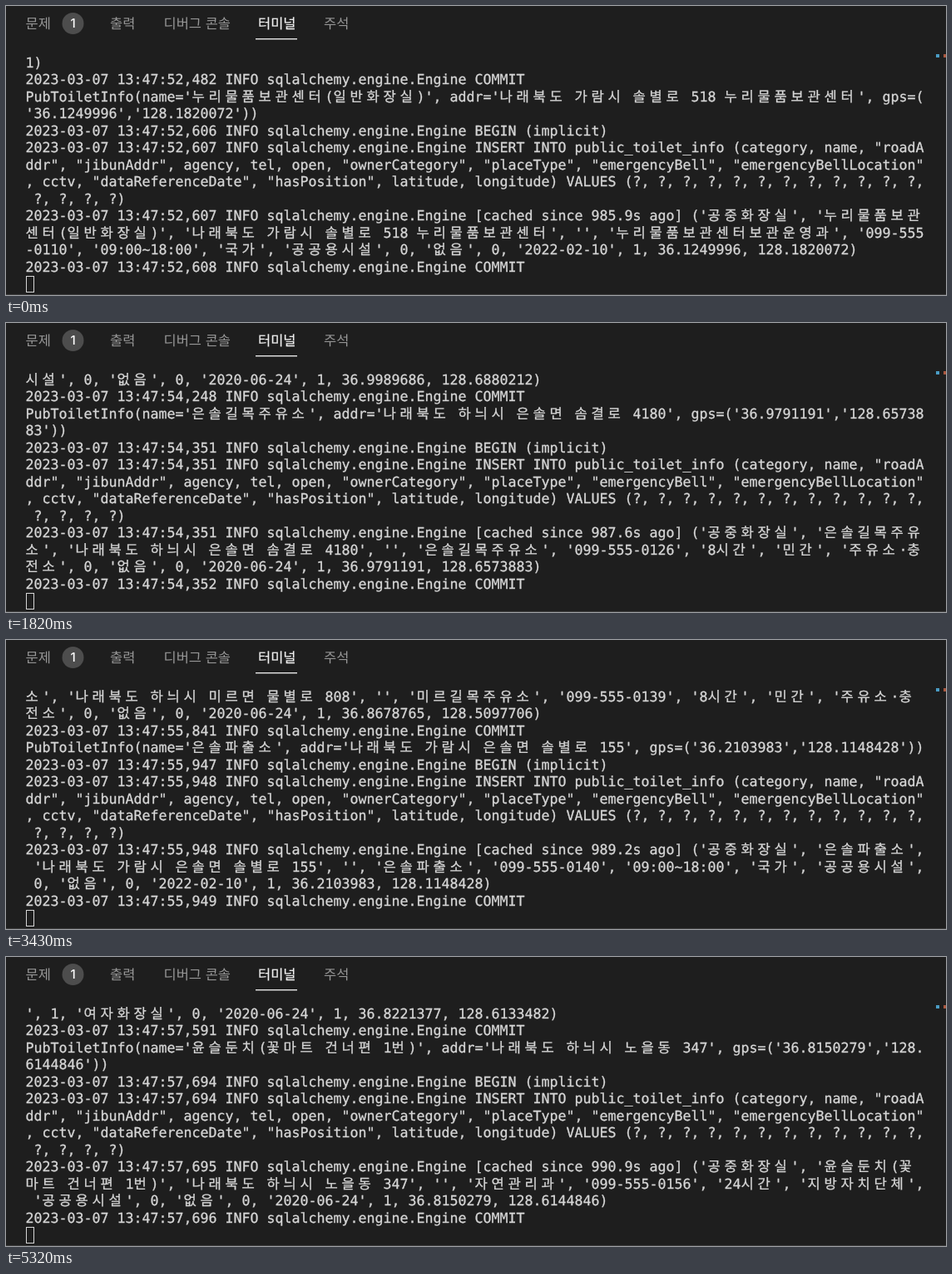
Animation of 1130 by 348 pixels, one loop 5390 ms. Source, as an HTML page:

```html
<!DOCTYPE html>
<html lang="ko">
<head>
<meta charset="utf-8">
<title>터미널</title>
<style>
  html, body { margin: 0; width: 100%; height: 100%; overflow: hidden; background: #1e1e1e; }
  svg { display: block; width: 1130px; height: 348px; text-rendering: geometricPrecision; }
  .tabs { font: 16.5px "Noto Sans CJK KR", sans-serif; fill: #979797; }
  .tabs .on { fill: #f0f0f0; stroke: #f0f0f0; stroke-width: 0.2; }
  .badge { font: 500 15px Inter, sans-serif; fill: #fff; text-anchor: middle; }
  .term { font: 16.61px "DejaVu Sans Mono", "Noto Sans CJK KR", monospace; fill: #d6d6d6; stroke: #d6d6d6; stroke-width: 0.3; }
</style>
</head>
<body>
<svg viewBox="0 0 1130 348">
  <rect width="1130" height="348" fill="#1e1e1e"/>
  <g class="tabs">
    <text x="23.5" y="27">문제</text>
    <text x="125" y="27">출력</text>
    <text x="189.5" y="27">디버그 콘솔</text>
    <text x="303" y="27" class="on">터미널</text>
    <text x="382" y="27">주석</text>
  </g>
  <circle cx="80.5" cy="21" r="13" fill="#4d4d4d"/>
  <text class="badge" x="80.5" y="26.4">1</text>
  <rect x="300" y="39" width="50" height="1.4" fill="#e7e7e7"/>
  <rect x="1118" y="58" width="4" height="4" fill="#4a9cc4"/>
  <rect x="1127" y="58" width="3" height="4" fill="#a9573f"/>
  <rect y="347" width="1130" height="1" fill="#3a3a3a"/>
  <g class="term" id="term"></g>
  <rect x="24.5" y="325.5" width="9" height="19" fill="none" stroke="#d6d6d6"/>
</svg>
<script>
const COLS = 108, CELL = 10, LEFT = 23.5, TOP = 74, PITCH = 20.5, VIEW = 13;
const TICK = 70;

// One mark per tick: r = whole record, h = record still uncommitted, c = its commit
const FEED = '--r-rrr-r-rr-r-rr-r-rrr-rhcrr-r-rr-r-r-r' +
  '-r-rhcrhcr-rhcr-r-rr-r-rhcr-rr-rr-rhc';

// Commit times of some records, in ms after 13:47:52
const COMMITS = [[0, 608], [5, 1195], [6, 1313], [15, 2248], [16, 2352], [26, 3514], [27, 3626],
  [33, 4272], [34, 4379], [38, 4851], [39, 4969], [45, 5591], [46, 5696]];

// name | address | agency | hours | owner | latitude | longitude | place | bell | bell location
const LOCAL = '지방자치단체', PUBLIC = '공공용시설', DAY = '09:00~18:00';
const PLACES = {
  0: `누리물품보관센터(일반화장실)|가람시 솔별로 518 누리물품보관센터|누리물품보관센터보관운영과|${DAY}|국가|36.1249996|128.1820072`,
  5: `새터면사무소|가람시 솔별로 71||${DAY}|${LOCAL}||`,
  6: `달솔면 보건지소|하늬시 달솔면 은결로 63||8시간|${LOCAL}|36.8614240|128.5250130`,
  15: `은솔면보건소|하늬시 은솔면 솜결로 964||8시간|${LOCAL}|36.9989686|128.6880212`,
  16: '은솔길목주유소|하늬시 은솔면 솜결로 4180||8시간|민간|36.9791191|128.6573883|주유소·충전소',
  26: '여울우체국|하늬시 미르면 미르로 82||8시간|국가|36.7748667|128.5782125',
  27: `미르면사무소(본관)|하늬시 미르면 미르로 85|미르면사무소|8시간|${LOCAL}|36.7747080|128.5786880`,
  33: `초롱동주민센터2층 화장실|가람시 물별로 236|초롱동주민센터|${DAY}|${LOCAL}|36.1104660|128.1233942`,
  34: `초롱동주민센터3층 화장실|가람시 물별로 236|초롱동주민센터|${DAY}|${LOCAL}|36.1104660|128.1233942`,
  38: '하늬도로관리사무소|하늬시 미르로 519번길 38|하늬시도로관리사무소|8시간|국가|36.8007690|128.5887630',
  39: '미르파출소|하늬시 미르면 구슬로 8||8시간|국가|36.7766524|128.5790140',
  45: `윤슬둔치공원입구|하늬시 노을동 351|자연관리과|24시간|${LOCAL}|36.8221377|128.6133482||1|여자화장실`,
  46: `윤슬둔치(꽃마트 건너편 1번)|하늬시 노을동 347|자연관리과|24시간|${LOCAL}|36.8150279|128.6144846`
};

const INSERT = 'INSERT INTO public_toilet_info (category, name, "roadAddr", "jibunAddr", agency, tel, open, ' +
  '"ownerCategory", "placeType", "emergencyBell", "emergencyBellLocation", cctv, "dataReferenceDate", ' +
  `"hasPosition", latitude, longitude) VALUES (${Array(16).fill('?').join(', ')})`;

let seed = 41;
const rand = () => (seed = seed * 16807 % 2147483647) / 2147483647;
const pick = list => list[Math.floor(rand() * list.length)];

function inventPlace(i) {
  const inGaram = i < 5 || (i > 29 && i < 36);
  const town = pick(['은솔', '미르', '달솔', '노을', '여울', '초롱', '윤슬']);
  const kind = pick(['면사무소', '면 보건지소', '마을회관', '체육공원', '파출소', '우체국', '길목주유소']);
  const road = pick(['솔별', '은결', '솜결', '구슬', '물별']);
  const fuel = kind.endsWith('주유소');
  const owner = fuel ? '민간' : /파출소|우체국/.test(kind) ? '국가' : LOCAL;
  const near = base => (base + rand() * 0.2).toFixed(7);
  return [town + kind, `${inGaram ? '가람시' : '하늬시'} ${town}면 ${road}로 ${Math.ceil(rand() * 900)}`, '',
    inGaram ? DAY : '8시간', owner, near(inGaram ? 36.05 : 36.77), near(inGaram ? 128.1 : 128.5),
    fuel ? '주유소·충전소' : ''];
}

function commitTime(i) {
  const k = Math.max(1, COMMITS.findIndex(c => c[0] >= i));
  const [a, ta] = COMMITS[k - 1], [b, tb] = COMMITS[k];
  return Math.round(ta + (tb - ta) * (i - a) / (b - a));
}

function engine(ms, text) {
  const sec = 52 + Math.floor(ms / 1000), frac = String(ms % 1000).padStart(3, '0');
  return `2023-03-07 13:47:${sec},${frac} INFO sqlalchemy.engine.Engine ${text}`;
}

const isWide = ch => /[가-힣]/.test(ch);

function wrap(text) {
  const rows = [''];
  let col = 0;
  for (const ch of text) {
    const w = isWide(ch) ? 2 : 1;
    if (col + w > COLS) { rows.push(''); col = 0; }
    rows[rows.length - 1] += ch;
    col += w;
  }
  return rows;
}

const log = [];
const print = text => log.push(...wrap(text));
const printCommit = i => print(engine(commitTime(i), 'COMMIT'));

function printRecord(i) {
  const [name, road, agency, open, owner, lat, lon, place, bell, bellAt] =
    PLACES[i] ? PLACES[i].split('|') : inventPlace(i);
  const addr = '나래북도 ' + road;
  const date = road.startsWith('가람시') ? '2022-02-10' : '2020-06-24';
  const t = commitTime(i);
  // Small jitter in the engine's clock
  const beginLag = i % 23 === 16 ? 1 : 2, insertLag = i % 20 === 6 ? 2 : 1;
  const age = ((t - 1) / 1000 + 985.25).toFixed(1);
  const spot = lat ? `1, ${Number(lat)}, ${Number(lon)}` : '0, None, None';
  const texts = ['공중화장실', name, addr, '', agency || name, `099-555-01${10 + i}`, open, owner, place || PUBLIC];

  print(`PubToiletInfo(name='${name}', addr='${addr}', gps=(${lat ? `'${lat}','${lon}'` : 'None,None'}))`);
  print(engine(t - beginLag, 'BEGIN (implicit)'));
  print(engine(t - insertLag, INSERT));
  print(engine(t - 1, `[cached since ${age}s ago] (${texts.map(s => `'${s}'`).join(', ')}, ` +
    `${bell || 0}, '${bellAt || '없음'}', 0, '${date}', ${spot})`));
}

print('1)');
print(engine(482, 'COMMIT'));
printRecord(0);
printCommit(0);

let count = 0;
const ends = [...FEED].map(mark => {
  if (mark === 'r' || mark === 'h') printRecord(++count);
  if (mark === 'r' || mark === 'c') printCommit(count);
  return log.length;
});

// Words and wide letters each start on their own cell
function rowMarkup(row, n) {
  let col = 0, spans = '';
  for (const run of row.match(/[가-힣]|[!-~·]+| +/g)) {
    if (run[0] !== ' ') spans += `<tspan x="${LEFT + col * CELL}">${run}</tspan>`;
    col += isWide(run) ? 2 : run.length;
  }
  return `<text y="${Math.floor(TOP + n * PITCH)}">${spans}</text>`;
}

const term = document.getElementById('term');
let shown = -1;

function draw() {
  const end = ends[Math.floor(performance.now() / TICK) % FEED.length];
  if (end !== shown) {
    term.innerHTML = log.slice(end - VIEW, end).map(rowMarkup).join('');
    shown = end;
  }
  requestAnimationFrame(draw);
}
draw();
</script>
</body>
</html>
```
